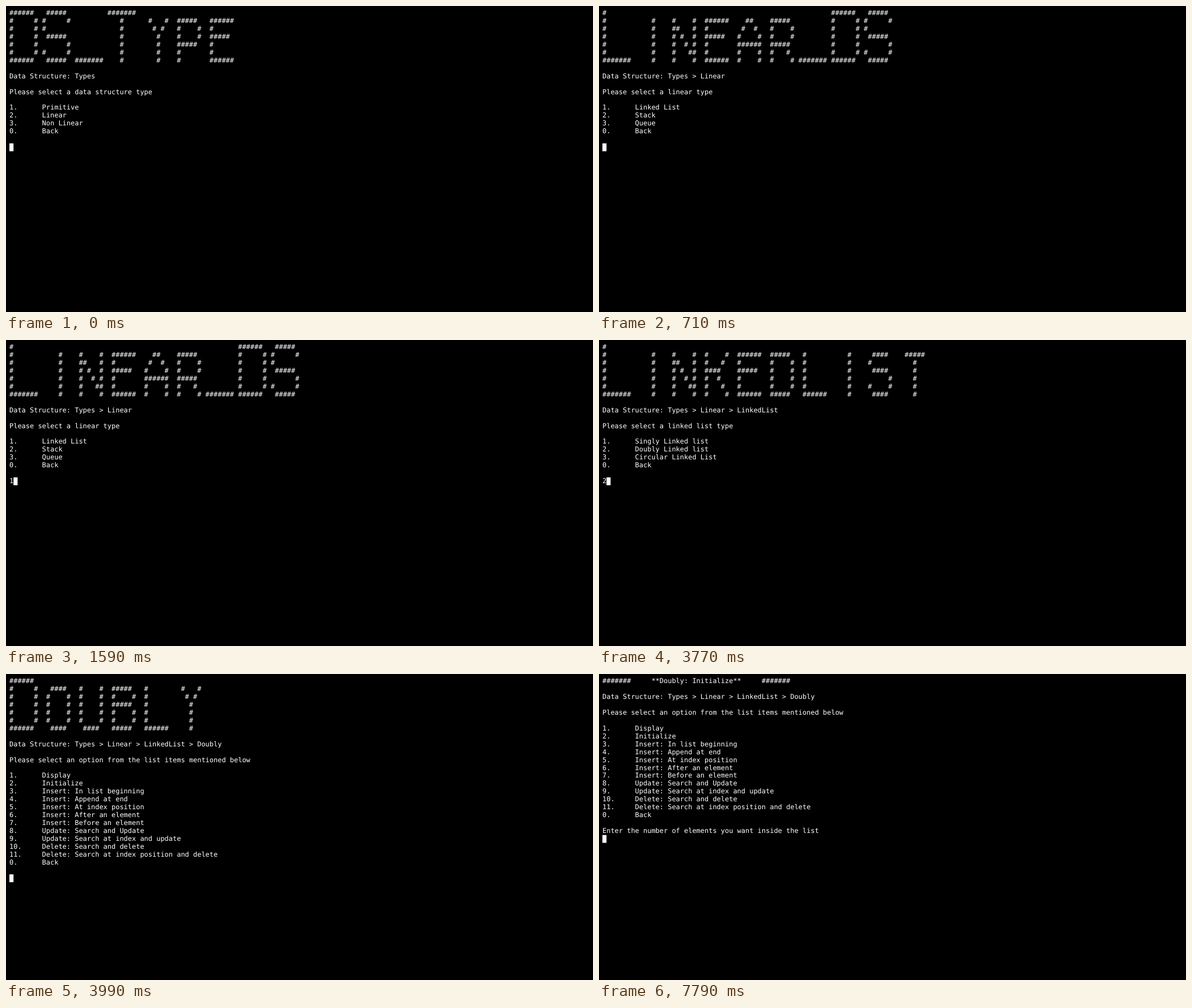
Animation, 1035 px wide and 541 px high, one loop 8000 ms. Source, as an HTML page with a canvas:

```html
<!DOCTYPE html>
<html>
<head>
<meta charset="utf-8">
<style>
  html, body { margin: 0; width: 100%; height: 100%; overflow: hidden; background: #000; }
  canvas { display: block; }
</style>
</head>
<body>
<canvas id="term" width="1035" height="541"></canvas>
<script>
const ctx = document.getElementById('term').getContext('2d');
const LOOP = 8000, LEFT = 6, TOP = 6.2, BASELINE = 16.4, CELL_W = 7.2, CELL_H = 13.92;

const typesBanner = `
######   #####          #######
#     # #     #            #      #   #  #####   ######
#     # #                  #       # #   #    #  #
#     #  #####             #        #    #    #  #####
#     #       #            #        #    #####   #
#     # #     #            #        #    #       #
######   #####  #######    #        #    #       ######`;

const linearBanner = `
#                                                       ######   #####
#           #    #    #  ######    ##    #####          #     # #     #
#           #    ##   #  #        #  #   #    #         #     # #
#           #    # #  #  #####   #    #  #    #         #     #  #####
#           #    #  # #  #       ######  #####          #     #       #
#           #    #   ##  #       #    #  #   #          #     # #     #
#######     #    #    #  ######  #    #  #    # ####### ######   #####`;

const linkedBanner = `
#
#           #    #    #  #    #  ######  #####   #          #     ####    #####
#           #    ##   #  #   #   #       #    #  #          #    #          #
#           #    # #  #  ####    #####   #    #  #          #     ####      #
#           #    #  # #  #  #    #       #    #  #          #         #     #
#           #    #   ##  #   #   #       #    #  #          #    #    #     #
#######     #    #    #  #    #  ######  #####   ######     #     ####      #`;

const doublyBanner = `
######
#     #   ####   #    #  #####   #        #   #
#     #  #    #  #    #  #    #  #         # #
#     #  #    #  #    #  #####   #          #
#     #  #    #  #    #  #    #  #          #
#     #  #    #  #    #  #    #  #          #
######    ####    ####   #####   ######     #`;

const doublyOptions = [
  'Display', 'Initialize', 'Insert: In list beginning', 'Insert: Append at end',
  'Insert: At index position', 'Insert: After an element', 'Insert: Before an element',
  'Update: Search and Update', 'Update: Search at index and update',
  'Delete: Search and delete', 'Delete: Search at index position and delete'
];

// Returns the lines of a menu; the last, empty line is the input line.
function menu(banner, path, prompt, options) {
  const items = options.map((name, i) => `${i + 1}.`.padEnd(8) + name);
  return [...banner.trim().split('\n'), '', 'Data Structure: Types' + path, '',
    'Please select ' + prompt, '', ...items, '0.      Back', '', ''];
}

const doublyPath = ' > Linear > LinkedList > Doubly';
const doublyPrompt = 'an option from the list items mentioned below';

const types = menu(typesBanner, '', 'a data structure type',
  ['Primitive', 'Linear', 'Non Linear']);
const linear = menu(linearBanner, ' > Linear', 'a linear type',
  ['Linked List', 'Stack', 'Queue']);
const linked = menu(linkedBanner, ' > Linear > LinkedList', 'a linked list type',
  ['Singly Linked list', 'Doubly Linked list', 'Circular Linked List']);
const doubly = menu(doublyBanner, doublyPath, doublyPrompt, doublyOptions);
const initialize = menu('#######     **Doubly: Initialize**     #######',
  doublyPath, doublyPrompt, doublyOptions);
initialize.splice(-1, 0, 'Enter the number of elements you want inside the list');

// Each screen: start time, lines, time of the key press, key.
const screens = [
  [0, types, 500, '2'],
  [710, linear, 1590, '1'],
  [1800, linked, 3770, '2'],
  [3990, doubly, 7460, '2'],
  [7790, initialize, LOOP, '']
];

function drawLine(text, row) {
  const y = Math.round(BASELINE + row * CELL_H);
  [...text].forEach((char, col) => {
    if (char !== ' ') ctx.fillText(char, LEFT + col * CELL_W, y);
  });
}

function draw(now) {
  const t = now % LOOP;
  const [, lines, keyTime, key] = screens.findLast(([start]) => t >= start);
  const input = t >= keyTime ? key : '';
  const inputRow = lines.length - 1;

  ctx.fillStyle = '#000';
  ctx.fillRect(0, 0, 1035, 541);
  ctx.fillStyle = '#fff';
  ctx.font = '11.96px "DejaVu Sans Mono", monospace';
  ctx.textRendering = 'geometricPrecision';
  lines.forEach(drawLine);
  drawLine(input, inputRow);
  ctx.fillRect(LEFT + input.length * CELL_W, TOP + inputRow * CELL_H, CELL_W, CELL_H);
}

const begin = performance.now();
function tick() {
  draw(performance.now() - begin);
  requestAnimationFrame(tick);
}
tick();
</script>
</body>
</html>
```
